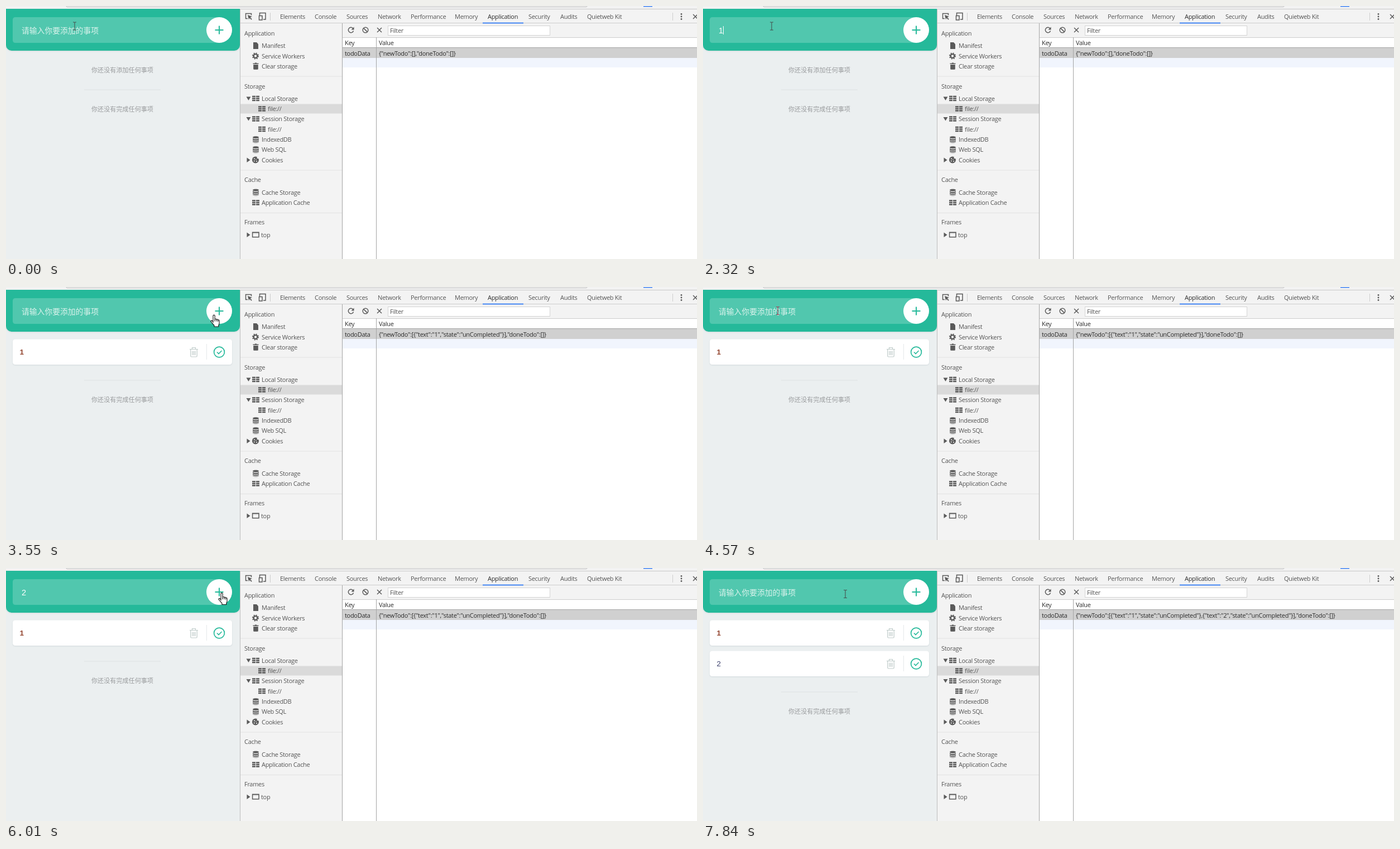
These frames come from a looping animation (1238x453 px, 7.99 s). An HTML page:

```html
<!DOCTYPE html>
<html lang="zh">
<head>
<meta charset="utf-8">
<title>Todo storage</title>
<style>
  html, body { margin: 0; width: 100%; height: 100%; overflow: hidden; background: #ebeff0; }
  svg { display: block; width: 1238px; height: 453px; }
  text { font: 11px "Open Sans", "Noto Sans", sans-serif; letter-spacing: -.3px; fill: #555; white-space: pre; }
  .dark { fill: #2c2c2c; }
  .hint, .empty { font-family: "Noto Sans CJK SC", "Noto Sans CJK JP", "Noto Sans CJK", sans-serif; letter-spacing: 0; }
  .hint { font-size: 13.8px; fill: #dcf3ed; }
  .empty { font-size: 11.1px; fill: #999b9d; }
  .typed, .item { font-family: "Liberation Sans", Arial, sans-serif; }
  .typed { font-size: 14.5px; fill: #fff; }
  .item { font-size: 13.5px; }
  .brown { fill: #93452f; font-weight: bold; }
  .navy { fill: #3c406c; }
  .line { fill: none; stroke: #5a5a5a; stroke-width: 1.5; }
  .card { filter: drop-shadow(0 1px 1px rgba(44, 62, 80, .12)); }
</style>
</head>
<body>
<svg viewBox="0 0 1238 453">
  <defs>
    <path id="file" d="M2 0h6l3 3.2V12H2z"/>
    <g id="gear" fill="none" stroke="#5a5a5a">
      <circle cx="6" cy="6" r="3.4" stroke-width="2.4"/>
      <circle cx="6" cy="6" r="5.1" stroke-width="2" stroke-dasharray="2 2.005"/>
    </g>
    <path id="bin" d="M1.5 1h3l.8-1h2.4l.8 1h3v1.6h-10zM2.2 3.4h8.6V11q0 1.3-1.3 1.3h-6Q2.2 12.3 2.2 11z"/>
    <path id="grid" d="M0 2.5h6m1 0h6M0 6h6m1 0h6M0 9.5h6m1 0h6" stroke="#5a5a5a" stroke-width="2.7"/>
    <path id="base" d="M1 2.2C1-.4 12-.4 12 2.2S1 4.8 1 2.2M1 4q5.5 3 11 0v2.3q-5.5 3-11 0zM1 7.2q5.5 3 11 0v1.8q-5.5 3-11 0zM1 10q5.5 3 11 0v.8q-5.5 3-11 0z"/>
    <g id="cookie">
      <circle cx="6" cy="6" r="6"/>
      <g fill="#f3f3f3"><circle cx="10.5" cy="2" r="2"/><circle cx="4" cy="4" r="1.1"/><circle cx="3.8" cy="8" r="1.1"/><circle cx="8" cy="8.5" r="1.1"/><circle cx="7" cy="5.3" r=".8"/></g>
    </g>
    <path id="pane" class="line" d="M.6 1.7h11.4v8.6H.6zM.6 2.3h11.4"/>
    <path id="open" d="M0 0h8L4 6.5z"/>
    <path id="shut" d="M1-1l6 4.2L1 7.5z"/>
    <g id="card">
      <rect class="card" x="12" y="93.5" width="393" height="45.5" rx="4.5" fill="#fff"/>
      <path d="M359.5 102v28" stroke="#e4e9ea"/>
      <path d="M329 111.5h15M333.5 111v-2.5h6v2.5M330.8 112v11.5q0 1.5 1.5 1.5h8.4q1.5 0 1.5-1.5V112M334 114.5v7.5M336.5 114.5v7.5M339 114.5v7.5" fill="none" stroke="#bfcbc9" stroke-width="1.2"/>
      <circle cx="382" cy="116.5" r="9.4" fill="none" stroke="#25b99a" stroke-width="1.7"/>
      <path d="M378 116.500l3 3 5.500-5.500" fill="none" stroke="#25b99a" stroke-width="1.6"/>
    </g>
  </defs>

  <rect width="1238" height="6" fill="#f2f2f2"/>
  <path class="card" d="M0 5h419v65a10 10 0 0 1-10 10H10a10 10 0 0 1-10-10z" fill="#25b99a"/>
  <path d="M17 20h365a23 23 0 0 1 0 46H17q-5 0-5-5V25q0-5 5-5z" fill="#51c7ae"/>
  <circle cx="382" cy="43" r="23" fill="#fff"/>
  <path d="M374.500 43h15M382 35.500v15" stroke="#25b99a" stroke-width="2"/>
  <text id="hint" class="hint" x="28" y="48.500">请输入你要添加的事项</text>
  <text id="typed" class="typed" x="28" y="48.500"></text>
  <path id="caret" d="M0 36v15" stroke="#fff"/>
  <text id="noTodo" class="empty" x="153" y="119">你还没有添加任何事项</text>
  <g id="card1"><use href="#card"/><text class="item brown" x="24.500" y="121.300">1</text></g>
  <g id="card2" transform="translate(0 55)"><use href="#card"/><text class="item navy" x="24.500" y="121.300">2</text></g>
  <g id="done">
    <path d="M140 150h137" stroke="#dde1e2"/>
    <text class="empty" x="153" y="189">你还没有完成任何事项</text>
  </g>

  <rect x="419" y="6" width="819" height="447" fill="#f3f3f3"/>
  <path d="M108 0q0 1.500 2 1.500h929q2 0 2-1.500" fill="#fff" stroke="#b4b4b4"/>
  <path d="M419 5.500h819" stroke="#c8c8c8"/>
  <path d="M1142 .5h16" stroke="#4285f4" stroke-width="2"/>
  <rect x="603" y="56" width="635" height="397" fill="#fff"/>
  <rect x="603" y="75" width="635" height="18" fill="#d0d0d0"/>
  <rect x="603" y="93" width="635" height="17" fill="#f1f5fd"/>
  <rect x="420" y="175.500" width="182" height="17" fill="#dadada"/>
  <rect x="684.500" y="35.500" width="290" height="17" fill="#fff" stroke="#d4d4d4"/>
  <path d="M420 30.500h818M603 56.500h635M473.500 12v14M1194.500 12v14" stroke="#cdcdcd"/>
  <path d="M603 74.500h635M663.500 56v397M602.500 31v422" stroke="#a5a5a5"/>
  <path d="M419.500 6v447" stroke="#bdbdbd"/>
  <path d="M420 126h182M420 294h182M420 370.500h182" stroke="#e2e2e2"/>
  <path d="M854 30.500h73" stroke="#4285f4" stroke-width="2"/>

  <path class="line" d="M433 22.500h-3.500v-9h10v3M454.500 17v-4.500h10.500V24h-4M453.500 17.500h5.500v7.500h-5.500z"/>
  <path d="M433 16l8 3-3.300 1.300 3 3.200-1.200 1.200-3.100-3.100-1.300 2.800z" fill="#5a5a5a"/>
  <path class="line" d="M621.500 39.800a4.700 4.700 0 1 0 1 4.700M665 39l8 8m0-8l-8 8M1231 15l8 8m0-8l-8 8"/>
  <path d="M623.500 37.500v5h-5z" fill="#5a5a5a"/>
  <circle class="line" cx="644" cy="43" r="4.800"/>
  <path class="line" d="M640.600 39.600l6.800 6.800"/>
  <g fill="#5a5a5a"><circle cx="1210" cy="14.500" r="1.400"/><circle cx="1210" cy="19" r="1.400"/><circle cx="1210" cy="23.500" r="1.400"/></g>
  <g id="labels" fill="#5a5a5a"></g>
  <text id="value" class="dark" x="668" y="89"></text>

  <path id="ibeam" d="M-3-7h2q1 0 1 1 0-1 1-1h2M0-6V6M-3 7h2q1 0 1-1 0 1 1 1h2" fill="none" stroke-width="1.100"/>
  <path id="hand" d="M-1.500 14.500V2.200a1.600 1.600 0 0 1 3.200 0V8q3-.6 3 .6 2.400-.6 2.600.8 2.300-.5 2.300 1.400V15q0 2-1.300 4v2.500H.5v-2.200L-5 13q-1.200-2 .6-2.400 1.400 0 2.900 2zM1.700 8v4M4.700 8.600V12M7.300 9.400V12.500" fill="#fff" stroke="#111" stroke-width="1.100"/>
</svg>
<script>
const LOOP = 7990;
const $ = id => document.getElementById(id);

// Developer tools labels: [text, x, baseline, class]
const labels = [
  ['Elements', 491, 23], ['Console', 553, 23], ['Sources', 610, 23], ['Network', 666, 23],
  ['Performance', 725, 23], ['Memory', 804, 23], ['Application', 863, 23, 'dark'],
  ['Security', 936, 23], ['Audits', 993, 23], ['Quietweb Kit', 1041, 23],
  ['Filter', 688, 48], ['Key', 607, 70, 'dark'], ['Value', 668, 70, 'dark'], ['todoData', 607, 89, 'dark'],
  ['Application', 427, 53], ['Storage', 427, 148], ['Cache', 427, 315], ['Frames', 427, 391]
];
// Sidebar tree: [icon, label, centre y, indent, arrow]
const tree = [
  ['file', 'Manifest', 71], ['gear', 'Service Workers', 89.5], ['bin', 'Clear storage', 107.5],
  ['grid', 'Local Storage', 165.5, 0, 'open'], ['grid', 'file://', 184, 11],
  ['grid', 'Session Storage', 202, 0, 'open'], ['grid', 'file://', 220.5, 11],
  ['base', 'IndexedDB', 239], ['base', 'Web SQL', 257], ['cookie', 'Cookies', 275.5, 0, 'shut'],
  ['base', 'Cache Storage', 333.5], ['grid', 'Application Cache', 352], ['pane', 'top', 409.5, -1, 'shut']
];
const label = ([text, x, y, kind = '']) => `<text class="${kind}" x="${x}" y="${y}">${text}</text>`;
const icon = (name, x, y) => `<use href="#${name}" x="${x}" y="${y}"/>`;
const row = ([name, text, y, indent = 0, arrow]) =>
  icon(name, 441 + Math.max(indent, 0), y - 6) +
  (arrow ? icon(arrow, 430.5, y - 3) : '') +
  label([text, 458 + indent, y + 4]);
$('labels').innerHTML = labels.map(label).join('') + tree.map(row).join('');

// Each track lists [start time, value...]; a value holds until the next start.
const GREY = '#45524f', RED = '#a23f56';
const pointer = [
  [0, 'ibeam', 123, 36, GREY], [2450, 'ibeam', 236, 44, GREY], [2570, 'ibeam', 301, 50, GREY],
  [2720, 'ibeam', 329, 45.5, GREY], [2870, 'hand', 371.5, 49.5], [3020, 'hand', 372.5, 49.5],
  [4290, 'hand', 360.5, 36], [4440, 'ibeam', 200, 33, GREY], [4570, 'ibeam', 134, 42.5, RED],
  [4720, 'ibeam', 133, 43.5, RED], [5610, 'ibeam', 149, 43.5, RED], [5760, 'ibeam', 265, 50, GREY],
  [5880, 'hand', 380, 45.5], [6010, 'hand', 386.5, 44], [6870, 'ibeam', 300, 45, GREY],
  [7000, 'ibeam', 242, 43.5, GREY], [7150, 'ibeam', 241, 43.5, GREY], [7840, 'ibeam', 255, 46.5, GREY]
];
const caret = [
  [0, 0], [680, 28.5], [1210, 0], [1640, 28.5], [2200, 0], [2320, 36.5], [2870, 0],
  [4840, 28.5], [5360, 36.5], [5880, 0], [7150, 28.5], [7710, 0]
];
const typed = [[0, ''], [2320, '1'], [3550, ''], [5360, '2'], [6470, '']];
const added = [[0, 0], [3550, 1], [6470, 2]];
const dividerShift = [0, 17, 72];

const at = (track, time) => track.filter(step => step[0] <= time).pop().slice(1);
const show = (id, on) => $(id).setAttribute('visibility', on ? 'visible' : 'hidden');
const todoJson = count => JSON.stringify({
  newTodo: ['1', '2'].slice(0, count).map(text => ({ text, state: 'unCompleted' })),
  doneTodo: []
});

function draw(time) {
  const [kind, x, y, color] = at(pointer, time);
  for (const id of ['ibeam', 'hand']) show(id, id === kind);
  $(kind).setAttribute('transform', `translate(${x} ${y})`);
  if (color) $(kind).setAttribute('stroke', color);

  const [caretX] = at(caret, time);
  show('caret', caretX);
  $('caret').setAttribute('transform', `translate(${caretX} 0)`);

  const [text] = at(typed, time);
  $('typed').textContent = text;
  show('hint', !text);

  const [count] = at(added, time);
  show('noTodo', count === 0);
  show('card1', count > 0);
  show('card2', count > 1);
  $('done').setAttribute('transform', `translate(0 ${dividerShift[count]})`);
  $('value').textContent = todoJson(count);
}

const start = performance.now();
function tick() {
  draw((performance.now() - start) % LOOP);
  requestAnimationFrame(tick);
}
tick();
</script>
</body>
</html>
```
